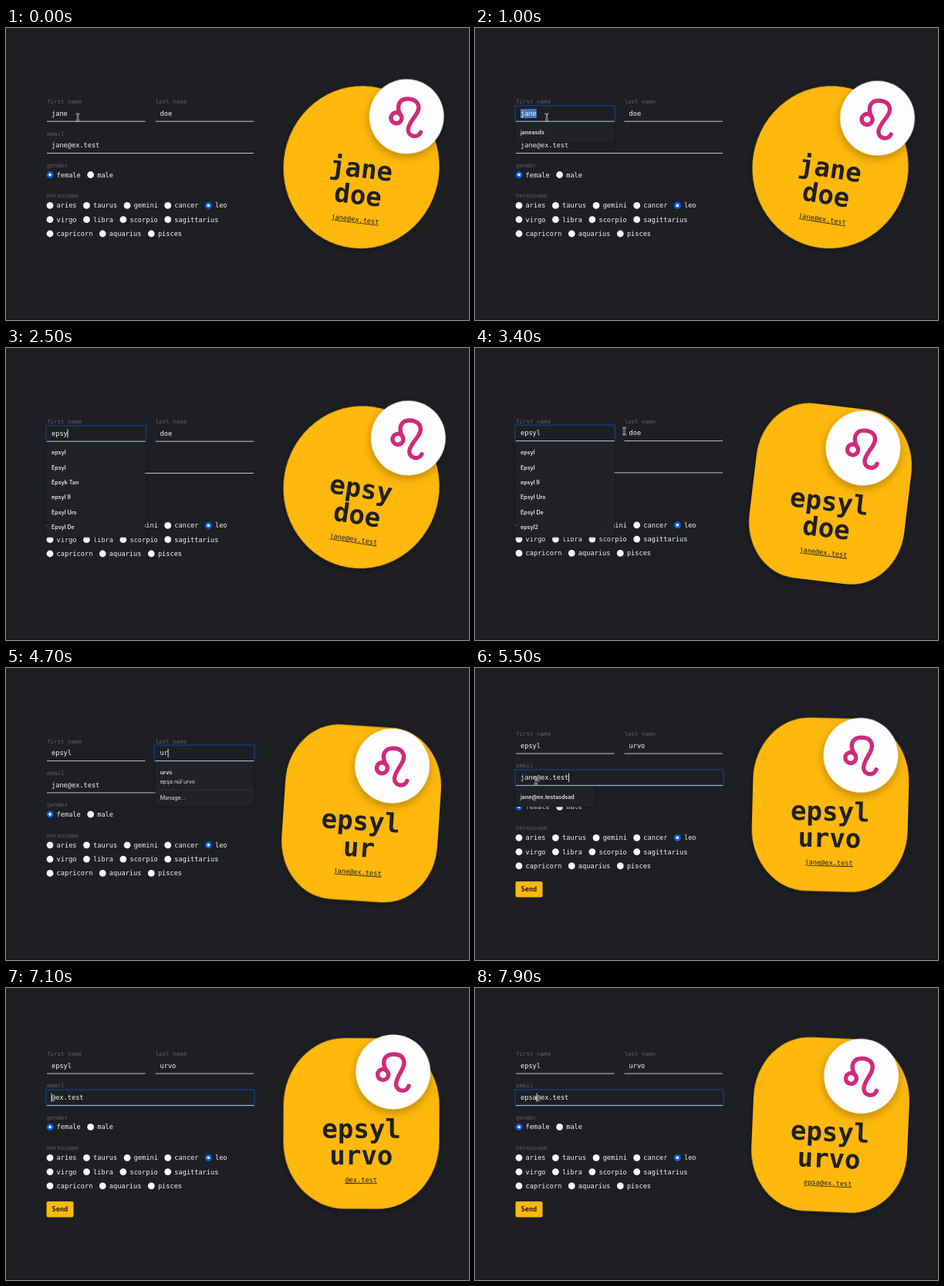
Write an HTML page that moves like this. It is 600 by 379 pixels and loops after 8 s.

```html
<!DOCTYPE html>
<html lang="en">
<head>
<meta charset="utf-8">
<title>Badge form</title>
<style>
  html, body { margin: 0; width: 100%; height: 100%; overflow: hidden; background: #1d1f23; }
  svg { display: block; width: 600px; height: 379px; }
  text { font: 8.65px "DejaVu Sans Mono", monospace; fill: #f4f4f4; white-space: pre; }
  .label { font-size: 7.5px; fill: #606266; }
  .menu text { font: 600 7.1px Inter, sans-serif; fill: #e6e6e7; }
  .menu .plain { font-weight: 400; }
  .menu rect { fill: #202226; filter: drop-shadow(0 1px 2px rgba(0, 0, 0, .25)); }
  .send { font-weight: bold; fill: #1d1f23; }
  .card text { text-anchor: middle; fill: #1f2023; }
  .card .name { font-size: 34px; font-weight: bold; }
  .card .mail { text-decoration: underline; }
  .shape { fill: #ffb80b; filter: drop-shadow(0 2px 4px rgba(0, 0, 0, .35)); }
  .ball { fill: #fdfdfd; filter: drop-shadow(0 4px 6px rgba(0, 0, 0, .28)); }
  .leo { fill: none; stroke: #d02a7b; stroke-width: 5.4; stroke-linecap: round; }
  .field { stroke: #c4c5c7; }
  .ring { fill: none; stroke: #16356f; stroke-width: 1.8; }
</style>
</head>
<body>
<svg viewBox="0 0 600 379">
  <rect y="378" width="600" height="1" fill="#111315"/>
  <g id="form"></g>
  <g id="card"></g>
  <g id="over"></g>
</svg>
<script>
const LOOP = 8000, STEP = 100, CHAR = 5.207;
const $ = id => document.getElementById(id);

const FIELDS = {
  first: { label: 'first name', x: 53, y: 121, w: 127.5 },
  last: { label: 'last name', x: 193.5, y: 121, w: 127.5 },
  email: { label: 'email', x: 53, y: 162.3, w: 268 }
};
const GROUPS = [
  [190.5, ['female', 'male']],
  [230.4, ['aries', 'taurus', 'gemini', 'cancer', 'leo']],
  [248.7, ['virgo', 'libra', 'scorpio', 'sagittarius']],
  [267, ['capricorn', 'aquarius', 'pisces']]
];
const PICKED = ['female', 'leo'];

const MENUS = {
  jane: ['janeasds'],
  early: ['epsyl', 'Epsyl', 'Epsyk Tan', 'epsyl 9', 'Epsyl Uro', 'Epsyl De'],
  late: ['epsyl', 'Epsyl', 'epsyl 9', 'Epsyl Uro', 'Epsyl De', 'epsyl2'],
  mail: ['jane@ex.testasdsad']
};

// Each entry changes part of the state from its time on.
const EVENTS = [
  [0, { first: 'jane', last: 'doe', email: 'jane@ex.test', shift: 0 }],
  [500, { focus: 'first', caret: 4, menu: 'jane' }],
  [700, { selected: true }],
  [1500, { first: 'e', caret: 1, selected: false, menu: 'early' }],
  [1800, { first: 'ep', caret: 2 }],
  [2100, { first: 'eps', caret: 3 }],
  [2400, { first: 'epsy', caret: 4 }],
  [2800, { first: 'epsyl', caret: 5, menu: 'late', shift: -0.6 }],
  [3300, { caret: null }],
  [3800, { focus: 'last', caret: 3, menu: null }],
  [4000, { selected: true }],
  [4300, { last: 'u', caret: 1, selected: false, menu: 'manage' }],
  [4600, { last: 'ur', caret: 2 }],
  [4800, { last: 'urv', caret: 3 }],
  [5000, { last: 'urvo', caret: 4 }],
  [5300, { focus: 'email', caret: 12, menu: 'mail' }],
  [5500, { shift: -10.1, send: true }],
  [6500, { caret: 4, menu: null }],
  [6700, { email: 'jan@ex.test', caret: 3 }],
  [6800, { email: 'ja@ex.test', caret: 2 }],
  [6900, { email: 'j@ex.test', caret: 1 }],
  [7000, { email: '@ex.test', caret: 0 }],
  [7200, { email: 'e@ex.test', caret: 1 }],
  [7400, { email: 'ep@ex.test', caret: 2 }],
  [7600, { email: 'eps@ex.test', caret: 3 }],
  [7800, { email: 'epsa@ex.test', caret: 4 }]
];

// Tilt in degrees, and corner radius as a share of the side.
const TILT = [[0, 6.8], [1000, 8.9], [1800, 9.9], [2500, 8.7], [3400, 6.8],
  [4700, 3.8], [6300, 0], [6800, -0.1], [7900, 2.5]];
const ROUND = [[0, .5], [2700, .5], [3200, .33], [3400, .33], [4700, .338],
  [5400, .355], [6300, .41], [6650, .42], [7300, .38], [7900, .354]];
const MOUSE = [
  [[0, 93, 116], [1500, 93, 116]],
  [[3100, 93, 116], [3400, 193.5, 108], [3700, 216, 112], [4300, 216, 112]],
  [[5000, 216, 112], [5300, 79, 146], [6700, 79, 146]]
];

function curve(keys, t, col = 1) {
  let i = 0;
  while (i < keys.length - 2 && t >= keys[i + 1][0]) i++;
  const a = keys[i], b = keys[i + 1];
  const span = b[0] - a[0], u = Math.min(1, Math.max(0, (t - a[0]) / span));
  const slope = k => {
    const p = keys[k - 1], q = keys[k], r = keys[k + 1];
    if (!p || !r) return (b[col] - a[col]) / span;
    const s1 = (q[col] - p[col]) / (q[0] - p[0]), s2 = (r[col] - q[col]) / (r[0] - q[0]);
    return s1 * s2 <= 0 ? 0 : 2 * s1 * s2 / (s1 + s2);
  };
  const v = u * u, w = v * u;
  return a[col] * (2 * w - 3 * v + 1) + b[col] * (3 * v - 2 * w) +
    span * (slope(i) * (w - 2 * v + u) + slope(i + 1) * (w - v));
}

const stateAt = t => Object.assign({}, ...EVENTS.filter(e => e[0] <= t).map(e => e[1]));
const text = (x, y, s, cls = '') => `<text class="${cls}" x="${x}" y="${y}">${s}</text>`;
const rect = (x, y, w, h, attrs) => `<rect x="${x}" y="${y}" width="${w}" height="${h}" ${attrs || ''}/>`;

function drawField(key, s) {
  const { label, x, y, w } = FIELDS[key], left = x + 6;
  const on = s.focus === key;
  let out = text(x, y - 22.8, label, 'label');
  if (on) out += rect(x - 1, y - 20.3, w + 2, 20.8, 'class="ring"');
  out += `<path class="field" d="M${x} ${y + .2}h${w}"/>`;
  if (on && s.selected) out += rect(left, y - 16, s[key].length * CHAR, 12, 'fill="#4478b5"');
  out += text(left, y - 7, s[key]);
  if (on && !s.selected && s.caret != null)
    out += rect(left + s.caret * CHAR - .3, y - 15.5, .9, 11, 'fill="#fff"');
  return out;
}

function drawRadios([y, names]) {
  let x = 57, out = '';
  for (const name of names) {
    const picked = PICKED.includes(name);
    out += `<circle cx="${x}" cy="${y}" r="4.4" fill="${picked ? '#0b62ee' : '#fafafa'}"/>`;
    if (picked) out += `<circle cx="${x}" cy="${y}" r="1.8" fill="#fff"/>`;
    out += text(x + 8.6, y + 3, name);
    x += 21.4 + name.length * CHAR;
  }
  return out;
}

function drawForm(s) {
  let out = Object.keys(FIELDS).map(k => drawField(k, s)).join('');
  out += text(53, 181, 'gender', 'label') + text(53, 220.3, 'horoscope', 'label');
  out += GROUPS.map(drawRadios).join('');
  if (s.send) out += rect(52.5, 287.2, 35, 20.3, 'rx="2" fill="#ffb80b"') + text(59.5, 300.5, 'Send', 'send');
  return `<g transform="translate(0 ${s.shift})">${out}</g>`;
}

function drawMenu(s) {
  if (!s.menu) return '';
  let out;
  if (s.menu === 'manage') {
    out = rect(193.5, 122, 127, 57.5) + text(199.7, 138, 'urvo') +
      text(199.7, 149.6, 'epşa nül urvo', 'plain') +
      '<path d="M193.5 158.3h127" stroke="#34363a" stroke-width=".8"/>' +
      text(199.7, 170.8, 'Manage...', 'plain');
  } else {
    const mail = s.menu === 'mail', items = MENUS[s.menu];
    const top = mail ? 163.6 + s.shift : 122;
    out = rect(53, top, mail ? 102 : 127.3, 26.7 + 19.4 * (items.length - 1)) +
      items.map((item, i) => text(59, top + 16.1 + 19.4 * i, item)).join('');
  }
  return `<g class="menu">${out}</g>`;
}

function drawMouse(t) {
  const path = MOUSE.find(p => t >= p[0][0] && t < p[p.length - 1][0]);
  if (!path) return '';
  const beam = 'd="M-2.3 -4.5Q0 -4.5 0 -3Q0 -4.5 2.3 -4.5M0 -3V3M-2.3 4.5Q0 4.5 0 3Q0 4.5 2.3 4.5M-1.4 1.4h2.8"';
  return `<g fill="none" transform="translate(${curve(path, t)} ${curve(path, t, 2)})">
    <path ${beam} stroke="#d8d8d8" stroke-width="2"/><path ${beam} stroke="#222" stroke-width=".8"/></g>`;
}

// Rounder corners make the card shorter and push the ball outwards.
function drawCard(t, s) {
  const p = curve(ROUND, t), d = .5 - p;
  const hw = 101, hh = 105.5 + d * 50;
  const top = s.send ? 65 : 75.2;
  return `<g class="card" transform="translate(460.5 ${top + hh}) rotate(${curve(TILT, t)})">
    ${rect(-hw, -hh, 2 * hw, 2 * hh, `rx="${2 * hw * p}" ry="${2 * hh * p}" class="shape"`)}
    ${text(0, hh - 92, s.first, 'name')}${text(0, hh - 57.5, s.last, 'name')}
    ${text(0, hh - 34.5, s.email, 'mail')}
    <g transform="translate(${50.4 - d * 90} ${d * 50 - 72.3})">
      <circle class="ball" r="48.4"/>
      <g class="leo"><circle cx="-13" cy="3.5" r="7"/>
      <path d="M-9 -2C-15 -13 -12 -23 1 -23C14 -23 17 -13 11.5 -3C7 5 4 10 4 15.5C4 26 18 27 20.5 18"/></g>
    </g></g>`;
}

const start = performance.now();
let shown = -1;
function tick() {
  const t = Math.floor(((performance.now() - start) % LOOP) / STEP) * STEP;
  if (t !== shown) {
    shown = t;
    const s = stateAt(t);
    $('form').innerHTML = drawForm(s);
    $('card').innerHTML = drawCard(t, s);
    $('over').innerHTML = drawMenu(s) + drawMouse(t);
  }
  requestAnimationFrame(tick);
}
tick();
</script>
</body>
</html>
```
